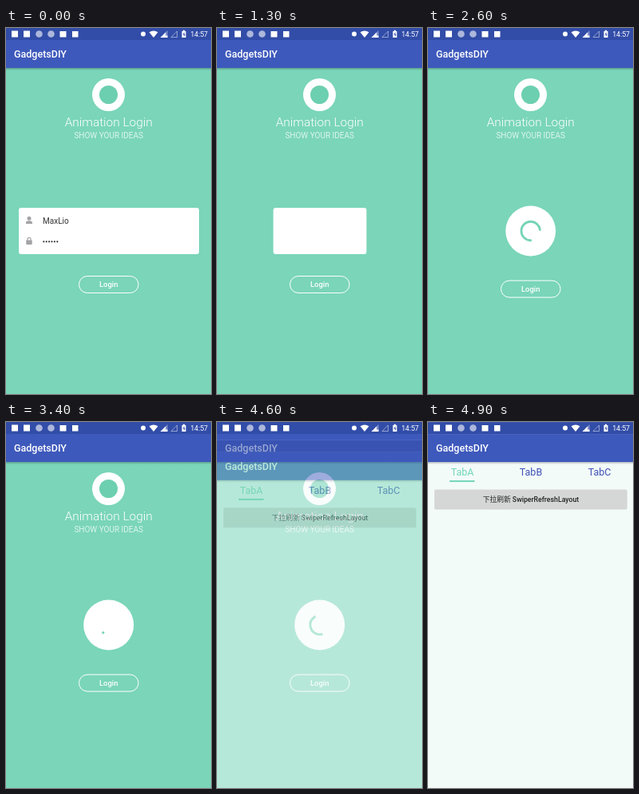
These frames come from a looping animation (257 px wide and 458 px high, 5 s). An HTML page:

```html
<!DOCTYPE html>
<html lang="en">
<head>
<meta charset="utf-8">
<title>Login animation</title>
<style>
  html, body { margin: 0; width: 100%; height: 100%; overflow: hidden; }
  svg { display: block; width: 257px; height: 458px; font-family: Roboto, "Noto Sans CJK SC", "Noto Sans CJK", sans-serif; }
  .mid { text-anchor: middle; }
  .medium { font-weight: 500; }
  .light { font-weight: 300; }
</style>
</head>
<body>
<svg viewBox="0 0 257 458">
  <defs>
    <linearGradient id="shade" x2="0" y2="1">
      <stop stop-color="#000" stop-opacity=".25"/>
      <stop offset="1" stop-color="#000" stop-opacity="0"/>
    </linearGradient>
    <g id="appBar">
      <rect y="50" width="257" height="3" fill="url(#shade)"/>
      <rect width="257" height="15" fill="#324da8"/>
      <rect y="15" width="257" height="35" fill="#3e59bc"/>
      <text x="10" y="37.3" font-size="12.5" class="medium" fill="#fff">GadgetsDIY</text>
    </g>
  </defs>

  <rect width="257" height="458" fill="#7ad5b9"/>
  <use href="#appBar"/>
  <circle cx="128.5" cy="83.5" r="20.5" fill="#fff"/>
  <circle cx="128.5" cy="83.5" r="11.5" fill="#6ccfb0"/>
  <g class="mid" fill="#fff">
    <text x="128.7" y="123" font-size="15.4" class="light">Animation Login</text>
    <text x="128.7" y="138" font-size="10" opacity=".75">SHOW YOUR IDEAS</text>
  </g>

  <rect id="panel" y="225" height="58" rx="3" fill="#fff"/>
  <g id="fields">
    <g fill="#a3a3a6">
      <circle cx="29" cy="238.3" r="2.5"/>
      <path d="M25 245v-1.5q0-2.3 4-2.3t4 2.3v1.5z"/>
      <rect x="25.3" y="265.5" width="7.4" height="5.5" rx=".7"/>
      <path d="M27 266v-1.6a2 2 0 0 1 4 0v1.6" fill="none" stroke="#a3a3a6" stroke-width="1.2"/>
    </g>
    <text x="46" y="244.5" font-size="10" fill="#333">MaxLio</text>
    <path d="M47.3 267.3h18" stroke="#333" stroke-width="2.2" stroke-linecap="round" stroke-dasharray="0 3.4"/>
  </g>

  <g id="loader">
    <circle r="31.5" fill="#fff"/>
    <circle id="arc" r="11.8" fill="none" stroke="#76d3b6" stroke-width="2.8" stroke-linecap="square" pathLength="360"/>
  </g>

  <g id="button">
    <rect x="91.5" y="310.5" width="74.5" height="21" rx="10.5" fill="none" stroke="#fff"/>
    <text x="128.7" y="324.4" font-size="9.4" class="mid medium" fill="#fff">Login</text>
  </g>

  <g id="page">
    <rect width="257" height="458" fill="#f3fbf9"/>
    <use href="#appBar"/>
    <g class="mid" font-size="12.5" fill="#3f51b5">
      <text x="43" y="67.4" fill="#74d6b8">TabA</text>
      <text x="129" y="67.4">TabB</text>
      <text x="215" y="67.4">TabC</text>
    </g>
    <rect x="27" y="73" width="31.5" height="2" fill="#74d6b8"/>
    <rect x="8" y="85.5" width="241.5" height="24" rx="1.5" fill="#000" opacity=".15"/>
    <rect x="8" y="84.5" width="241.5" height="24" rx="1.5" fill="#d5d7d6"/>
    <text x="129" y="100.2" font-size="8.75" class="mid medium" fill="#222">下拉刷新 SwiperRefreshLayout</text>
  </g>

  <g fill="#fff">
    <rect x="7" y="3.5" width="8" height="8"/>
    <rect x="22" y="3.5" width="8" height="8"/>
    <circle cx="41.5" cy="7.5" r="4.3" opacity=".6"/>
    <circle cx="56.5" cy="7.5" r="4.3" opacity=".6"/>
    <rect x="67.5" y="4" width="8" height="7.5"/>
    <rect x="83" y="4" width="7.5" height="7.5"/>
    <circle cx="172" cy="7.5" r="3"/>
    <path d="M179.5 5.3q5.5-3.6 11 0l-5.5 6.7z"/>
    <path d="M202.5 3v9h-9z" opacity=".4"/>
    <path d="M200 5.5v4h2.5v2.5h-9z"/>
    <path d="M214.5 4v7.5h-7.5z" fill="none" stroke="#fff" stroke-width=".8" opacity=".6"/>
    <path d="M220.5 4h1.3v-1.2h2.4v1.2h1.3v8h-5z"/>
    <path d="M223.5 5l-1.8 3.3h1.2v2.7l1.8-3.3h-1.2z" fill="#324da8"/>
    <text x="253" y="10.8" font-size="8.75" text-anchor="end">14:57</text>
  </g>
</svg>
<script>
const LOOP = 5000, STEP = 100;
const PRESS = 800, SPIN = 1583, OPEN = 4557;
const SLOW = 1.365; // recorded milliseconds per device millisecond
const [panel, fields, loader, arc, button, page] =
  ["panel", "fields", "loader", "arc", "button", "page"].map(id => document.getElementById(id));

const clamp = v => Math.min(1, Math.max(0, v));
const show = (el, on) => el.setAttribute("visibility", on ? "visible" : "hidden");
const easeInOut = x => 0.5 - 0.5 * Math.cos(Math.PI * x);
const easeOut = (x, power) => 1 - (1 - clamp(x)) ** power;
const jelly = x => 2 ** (-10 * x) * Math.sin((x - 0.0375) * 2 * Math.PI / 0.15) + 1;

// Eases from 0 to 1 along the cubic (0,0) (.2,0) (.1,1) (.5,1), then stays at 1.
function trim(x) {
  if (x <= 0) return 0;
  if (x >= 0.5) return 1;
  let low = 0, high = 1;
  for (let i = 0; i < 25; i++) {
    const s = (low + high) / 2, r = 1 - s;
    if (0.6 * r * r * s + 0.3 * r * s * s + 0.5 * s ** 3 < x) low = s; else high = s;
  }
  return low * low * (3 - 2 * low);
}

function drawPanel(t) {
  const p = easeInOut(clamp((t - PRESS) / (SPIN - PRESS)) ** 1.6);
  const width = (226 - 150 * p) * (1 - 0.5 * p);
  panel.setAttribute("x", 129 - width / 2);
  panel.setAttribute("width", width);
  show(panel, t < SPIN);
  show(fields, t < PRESS);
}

function drawLoader(t) {
  const ms = (t - SPIN) / SLOW;
  show(loader, ms >= 0);
  button.setAttribute("transform", `translate(0 ${ms >= 0 ? 5.6 : 0})`);
  if (ms < 0) return;
  const scale = 0.5 + 0.5 * jelly(Math.min(1, ms / 1000));
  loader.setAttribute("transform", `translate(128.7 254) scale(${scale})`);
  const turns = ms / 1333, x = turns % 1;
  const start = 270 * trim(x - 0.5), end = 270 * trim(x);
  arc.setAttribute("stroke-dasharray", `${Math.max(0.1, end - start)} 400`);
  arc.setAttribute("transform", `rotate(${216 * turns + 90 * x + start - 90})`);
}

function drawPage(t) {
  const ms = (t - OPEN) / SLOW;
  show(page, ms >= 0);
  page.setAttribute("opacity", easeOut(ms / 200, 4));
  page.setAttribute("transform", `translate(0 ${36.6 * (1 - easeOut(ms / 350, 5))})`);
}

function draw(now) {
  const t = Math.floor(now % LOOP / STEP) * STEP;
  drawPanel(t);
  drawLoader(t);
  drawPage(t);
}

const begin = performance.now();
function tick() {
  draw(performance.now() - begin);
  requestAnimationFrame(tick);
}
tick();
</script>
</body>
</html>
```
